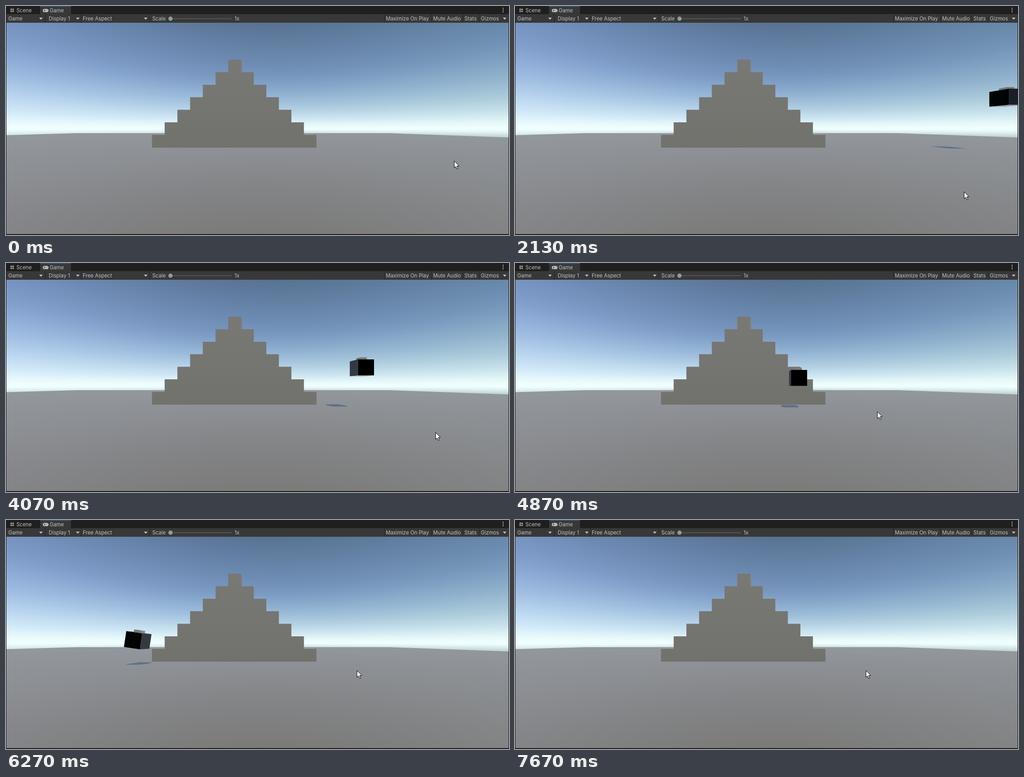
Write an HTML page with a canvas that moves like this. It is 1107 px wide and 506 px high and loops after 8 s.

```html
<!DOCTYPE html>
<html lang="en">
<head>
<meta charset="utf-8">
<title>Drifting crate</title>
<style>
  html, body { margin: 0; width: 100%; height: 100%; overflow: hidden; background: #191919; }
  canvas, svg { position: absolute; left: 0; top: 0; display: block; }
  text { font: 11.3px Inter, "Open Sans", sans-serif; fill: #c2c2c2; }
</style>
</head>
<body>
<canvas id="scene" width="1107" height="506"></canvas>
<svg width="1107" height="506" viewBox="0 0 1107 506">
  <rect width="1107" height="18" fill="#1f1f1f"/>
  <rect x="75" width="68" height="18" fill="#383838"/>
  <rect x="75" width="68" height="1.5" fill="#2c5d87"/>
  <rect y="18" width="1107" height="19" fill="#383838"/>
  <path d="M.5 18V506M1106.5 37V506" stroke="#191919"/>
  <rect y="504" width="1107" height="2" fill="#191919"/>
  <path d="M86.5 18V37M165.5 18V37M316.5 18V37M832.5 18V37M936.5 18V37M1005.5 18V37M1041.5 18V37" stroke="#232323"/>
  <path d="M11.5 5V14M15.5 5V14M9 7.5H18M9 11.5H18" stroke="#c4c4c4" fill="none"/>
  <rect x="81" y="6.5" width="12.5" height="7" rx="3.5" fill="#c4c4c4"/>
  <path d="M83 10H87M85 8V12M89 10H90M91 9H92" stroke="#383838" fill="none"/>
  <g id="labels"></g>
  <path id="arrows" fill="#c4c4c4"/>
  <path d="M362 28H497" stroke="#5e5e5e" stroke-width="1.5"/>
  <circle cx="362" cy="28" r="4.7" fill="#999"/>
  <path d="M1094 4V14" stroke="#c4c4c4" stroke-width="2" stroke-dasharray="2"/>
  <path id="cursor" d="M.5 .5V15.8L4 12.5L6.4 18.2L8.8 17.2L6.4 11.5H11Z" fill="#fff" stroke="#000" stroke-linejoin="round"/>
</svg>
<script>
const WIDTH = 1107, HEIGHT = 506, LOOP = 8000, FRAME = 1000 / 15, LAST_FRAME = 115;
const VIEW = { x: 553, y: 271, focal: 404, top: 37, bottom: 504 };
const ctx = document.getElementById('scene').getContext('2d');
const cursor = document.getElementById('cursor');

const labels = [['Scene', 23, 14], ['Game', 96, 14], ['Game', 5, 32], ['Display 1', 94, 32],
  ['Free Aspect', 169, 32], ['Scale', 322, 32], ['1x', 503, 32], ['Maximize On Play', 836, 32],
  ['Mute Audio', 940, 32], ['Stats', 1009, 32], ['Gizmos', 1045, 32]];
document.getElementById('labels').innerHTML =
  labels.map(([s, x, y]) => `<text x="${x}" y="${y}">${s}</text>`).join('');
document.getElementById('arrows').setAttribute('d',
  [77, 158, 307.5, 1097.5].map(x => `M${x - 4} 25.8h8l-4 4.4z`).join(''));

// Monotone cubic through rows of [position, ...values].
function track(keys, t) {
  const last = keys.length - 1;
  if (t <= keys[0][0]) return keys[0].slice(1);
  if (t >= keys[last][0]) return keys[last].slice(1);
  const i = keys.findIndex(k => k[0] > t) - 1;
  const span = keys[i + 1][0] - keys[i][0], u = (t - keys[i][0]) / span, v = 1 - u;
  return keys[i].slice(1).map((a, n) => {
    const c = n + 1, b = keys[i + 1][c];
    const slope = j => (keys[j + 1][c] - keys[j][c]) / (keys[j + 1][0] - keys[j][0]);
    const tangent = j => {
      if (j === 0) return slope(0);
      if (j === last) return slope(last - 1);
      const p = slope(j - 1), q = slope(j);
      return p * q <= 0 ? 0 : 2 * p * q / (p + q);
    };
    return a * v * v * (1 + 2 * u) + tangent(i) * span * u * v * v
      + b * u * u * (3 - 2 * u) - tangent(i + 1) * span * u * u * v;
  });
}

const hex = n => [n >> 16, n >> 8 & 255, n & 255];
const ramp = stops => stops.map(([e, c]) => [e, ...hex(c)]);
const fade = (from, to, t0, t1) => t => `rgb(${track(ramp([[t0, from], [t1, to]]), t).map(Math.round)})`;

const skyRamp = ramp([[-.03, 0xbdd0d2], [0, 0xeffefe], [.06, 0xcfe7f7], [.176, 0x9dbbe0],
  [.3, 0x7d9ac7], [.58, 0x5f789d]]);
const groundRamp = ramp([[-.58, 0x7b7b7a], [-.3, 0x858689], [-.03, 0x92979d]]);

// Colour follows the elevation of the line of sight and darkens to the right.
function shade(rampKeys, dimming) {
  const layer = document.createElement('canvas');
  layer.width = WIDTH; layer.height = HEIGHT;
  const g = layer.getContext('2d'), image = g.createImageData(WIDTH, HEIGHT);
  const table = Array.from({ length: 1301 }, (_, i) => track(rampKeys, i / 1000 - .65));
  for (let y = VIEW.top; y < VIEW.bottom; y++) for (let x = 0; x < WIDTH; x++) {
    const e = (VIEW.y - y) / Math.hypot(VIEW.focal, x - VIEW.x);
    const [r, gr, b] = table[Math.round((e + .65) * 1000)];
    const dim = dimming * x / VIEW.x * Math.min(1, Math.abs(e) / .1);
    image.data.set([r - dim * .8, gr - dim * .6, b - dim * 1.2, 255], (y * WIDTH + x) * 4);
  }
  g.putImageData(image, 0, 0);
  return layer;
}

function trace(g, points) {
  g.beginPath();
  points.forEach(p => g.lineTo(p[0], p[1]));
  g.closePath();
}

function polygon(g, points, fill) {
  trace(g, points);
  g.fillStyle = fill;
  g.fill();
}

function paintBackdrop() {
  const sky = shade(skyRamp, 9), g = sky.getContext('2d');
  g.save();
  trace(g, [[0, 285.5], [155, 281], [843, 281], [1107, 290.5], [1107, 504], [0, 504]]);
  g.clip();
  g.drawImage(shade(groundRamp, 1), 0, 0);
  g.restore();
  const stone = g.createLinearGradient(0, 118, 0, 312);
  stone.addColorStop(0, '#787875');
  stone.addColorStop(1, '#72726d');
  const step = 27.7;
  for (let i = 0; i < 7; i++) {
    const y = 118.5 + i * step, left = 489.2 - i * 28, right = 517.7 + i * 27.6;
    polygon(g, [[left, y], [right, y], [right, y + step + .5], [left, y + step + .5]], stone);
  }
  polygon(g, [[517, 118.5], [519.5, 124], [519.5, 147], [517, 147]], '#7f7f7c');
  return sky;
}
const backdrop = paintBackdrop();

const toward = ([x, y], k) => [VIEW.x + (x - VIEW.x) * k, VIEW.y + (y - VIEW.y) * k];
const mix = (p, q, u) => [p[0] + (q[0] - p[0]) * u, p[1] + (q[1] - p[1]) * u];
const area = p => p.reduce((s, a, i) => {
  const b = p[(i + 1) % p.length];
  return s + a[0] * b[1] - a[1] * b[0];
}, 0);

function drawRibs(topA, topB, bottomA, bottomB, alpha) {
  ctx.beginPath();
  for (let u = .06; u < 1; u += .11) {
    ctx.moveTo(...mix(topA, topB, u));
    ctx.lineTo(...mix(bottomA, bottomB, u));
  }
  ctx.strokeStyle = `rgba(44,48,54,${alpha})`;
  ctx.stroke();
}

// Box between two depths, rolled about the crate centre; sides are top, right, bottom, left.
function prism(centre, roll, [x0, y0, x1, y1], near, far, colours, ribs = 0) {
  const c = Math.cos(roll), s = Math.sin(roll);
  const corners = [[x0, y0], [x1, y0], [x1, y1], [x0, y1]]
    .map(([x, y]) => [centre[0] + x * c - y * s, centre[1] + x * s + y * c]);
  const front = corners.map(p => toward(p, near)), back = corners.map(p => toward(p, far));
  front.forEach((p, i) => {
    const j = (i + 1) % 4, face = [p, front[j], back[j], back[i]];
    if (area(face) >= 0) return;
    polygon(ctx, face, colours.sides[i]);
    if (i === 1) drawRibs(front[1], back[1], front[2], back[2], ribs);
    if (i === 3) drawRibs(front[0], back[0], front[3], back[3], ribs);
  });
  polygon(ctx, front, colours.front);
  drawRibs(front[0], front[1], front[3], front[2], ribs);
}

const SIDE = 35.4, HALF = SIDE / 2, LOWEST = 267.7, ROLL_START = 5670;
const heights = [[2130, 200.5], [3200, 209.3], [4070, 230.7], [5670, LOWEST], [6800, 261], [7300, 244]];
const pointer = [[870, 986, 342], [1300, 988, 416], [2130, 988, 410], [2620, 611, 410], [3200, 929, 407],
  [3600, 981, 451], [4070, 945, 373], [4330, 833, 325], [5400, 772, 332]];
const frontTone = fade(0x1b1f27, 0x000000, 2130, 3500);
const leftTone = fade(0x020304, 0x343b45, 2130, 4070);
const rightTone = fade(0x6c7686, 0x060708, 5670, 6800);
const knobColours = { front: '#797975', sides: ['#959697', '#88898b', '#77777a', '#70747a'] };

// Coasts at first, then accelerates evenly to the left.
const crateAt = t => [
  1339 - .1065 * t - 1.725e-5 * Math.max(0, t - 1500) ** 2,
  track(heights, t)[0]
];

// Slanted light: the higher the crate, the farther left and deeper its shadow.
function drawShadow([x, y]) {
  const lift = LOWEST - y, depth = 1 - .00152 * lift;
  const [sx, sy] = toward([x - 1.2 * lift, VIEW.y + 49], depth);
  const at = (dx, k) => toward([sx + dx, sy], k);
  polygon(ctx, [at(-16, .89), at(16, .89), at(21, .945), at(16, 1), at(-16, 1), at(-21, .945)], '#5f6f89');
}

function drawCrate(centre, t) {
  const roll = .384 * (Math.max(0, t - ROLL_START) / 1130) ** 1.5;
  const ribs = .35 * Math.cos(Math.PI * (t - 3200) / 3600) ** 6;
  const colours = { front: frontTone(t), sides: ['#1d3b55', rightTone(t), '#9c989d', leftTone(t)] };
  const knob = () => prism(centre, roll, [-7.8, -HALF - 6, 7.8, -HALF], .976, .941, knobColours);
  const body = () => prism(centre, roll, [-HALF, -HALF, HALF, HALF], 1, .919, colours, ribs);
  const order = roll > .08 ? [body, knob] : [knob, body];
  order.forEach(draw => draw());
}

function render(time) {
  const frame = Math.min(LAST_FRAME, Math.floor((time % LOOP) / FRAME + .05)), t = frame * FRAME;
  const crate = crateAt(t);
  ctx.drawImage(backdrop, 0, 0);
  drawShadow(crate);
  drawCrate(crate, t);
  cursor.setAttribute('transform', `translate(${track(pointer, t).map(Math.round)})`);
}

const start = performance.now();
function loop() {
  render(performance.now() - start);
  requestAnimationFrame(loop);
}
loop();
</script>
</body>
</html>
```
